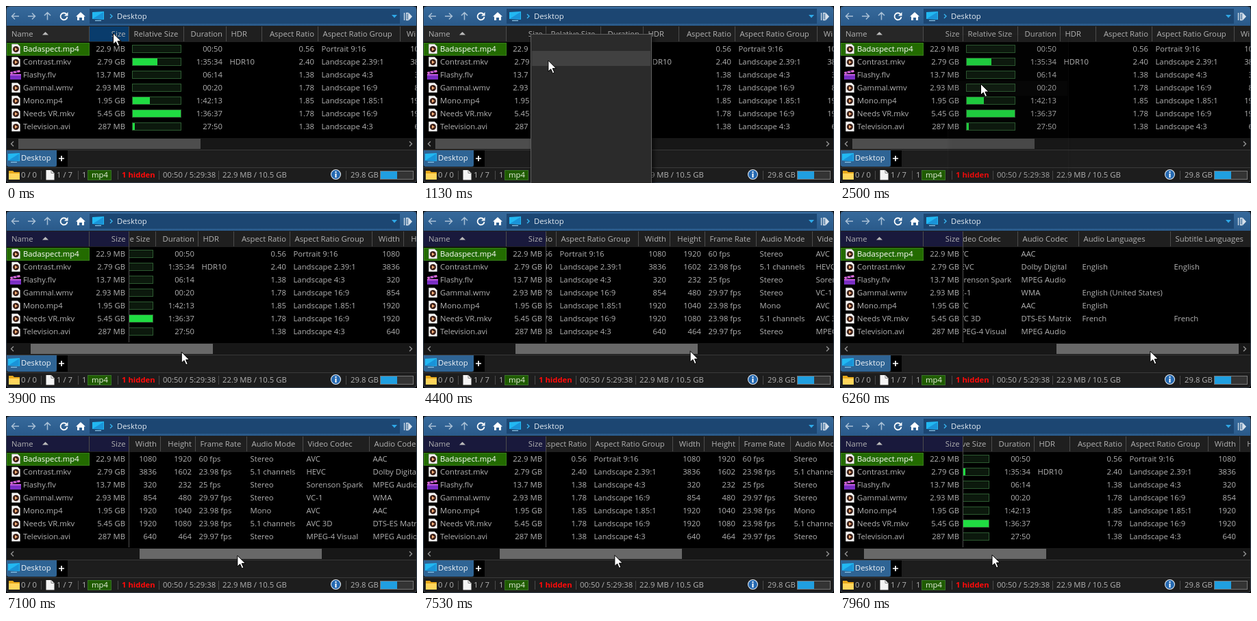
Animation of 600 by 260 pixels, one loop 8 s. Source, as an HTML page with a canvas:

```html
<!DOCTYPE html>
<html lang="en">
<head>
<meta charset="utf-8">
<title>File list with frozen columns</title>
<style>
html, body { margin: 0; width: 100%; height: 100%; overflow: hidden; background: #000; }
canvas { display: block; width: 600px; height: 260px; }
</style>
</head>
<body>
<canvas id="stage"></canvas>
<script>
const LOOP = 8000, FROZEN = 180, THUMB_MIN = 18, THUMB_W = 266, SCROLL_RATIO = 2.237;
const FONT = '11.3px "Open Sans", "Noto Sans", sans-serif';
const GREY = '#b2b2b2';
const canvas = document.getElementById('stage');
const c = canvas.getContext('2d');
const dpr = window.devicePixelRatio || 1;
canvas.width = 600 * dpr;
canvas.height = 260 * dpr;

const names = ['Badaspect.mp4', 'Contrast.mkv', 'Flashy.flv', 'Gammal.wmv', 'Mono.mp4', 'Needs VR.mkv', 'Television.avi'];
const sizes = ['22.9 MB', '2.79 GB', '13.7 MB', '2.93 MB', '1.95 GB', '5.45 GB', '287 MB'];
const shares = [0, 0.51, 0, 0, 0.35, 1, 0.045];

// title, left edge, right aligned, one value per row
const columns = [
  ['Relative Size', 180, false, ''],
  ['Duration', 260, true, '00:50|1:35:34|06:14|00:20|1:42:13|1:36:37|27:50'],
  ['HDR', 322, false, '|HDR10'],
  ['Aspect Ratio', 374, true, '0.56|2.40|1.38|1.78|1.85|1.78|1.38'],
  ['Aspect Ratio Group', 456, false, 'Portrait 9:16|Landscape 2.39:1|Landscape 4:3|Landscape 16:9|Landscape 1.85:1|Landscape 16:9|Landscape 4:3'],
  ['Width', 576, true, '1080|3836|320|854|1920|1920|640'],
  ['Height', 622, true, '1920|1602|232|480|1040|1080|464'],
  ['Frame Rate', 673, false, '60 fps|23.98 fps|25 fps|29.97 fps|23.98 fps|23.98 fps|29.97 fps'],
  ['Audio Mode', 748, false, 'Stereo|5.1 channels|Stereo|Stereo|Mono|5.1 channels|Stereo'],
  ['Video Codec', 830, false, 'AVC|HEVC|Sorenson Spark|VC-1|AVC|AVC 3D|MPEG-4 Visual'],
  ['Audio Codec', 927, false, 'AAC|Dolby Digital|MPEG Audio|WMA|AAC|DTS-ES Matrix|MPEG Audio'],
  ['Audio Languages', 1016, false, '|English||English (United States)|English|French'],
  ['Subtitle Languages', 1150, false, '|English||||French']
].map(([title, x, right, cells]) => ({ title, x, right, cells: cells.split('|') }));
const END = 1267;

const cursorKeys = [[0, 156.5, 40], [800, 156.5, 40], [1430, 205.5, 114.5], [2500, 205.5, 114.5], [3300, 238, 206],
  [3600, 241, 207], [3900, 256, 207], [4860, 513, 204.5], [5250, 545, 206], [5640, 540, 206],
  [6260, 453, 206], [7100, 338, 205], [7960, 222, 204]];
const thumbKeys = [[0, 18], [3650, 18], [3900, 36], [4140, 73], [4860, 243], [5200, 316], [6460, 316], [7100, 195], [7460, 125], [7960, 35]];

function at(keys, t) {
  const i = keys.findIndex(k => k[0] > t);
  if (i < 0) return keys[keys.length - 1].slice(1);
  const a = keys[i - 1], b = keys[i];
  let p = (t - a[0]) / (b[0] - a[0]);
  if (b[0] <= 3300) p = p * p * (3 - 2 * p);
  return a.slice(1).map((v, k) => v + (b[k + 1] - v) * p);
}

function rect(x, y, w, h, color) {
  c.fillStyle = color;
  c.fillRect(x, y, w, h);
}

function frame(x, y, w, h, color) {
  c.strokeStyle = color;
  c.lineWidth = 1;
  c.strokeRect(x + 0.5, y + 0.5, w - 1, h - 1);
}

function text(s, x, y, color = GREY, align = 'left', font = FONT) {
  c.font = font;
  c.fillStyle = color;
  c.textAlign = align;
  c.fillText(s, x, y);
}

function path(d, fill, stroke, width = 1) {
  const p = new Path2D(d);
  if (fill) { c.fillStyle = fill; c.fill(p); }
  if (stroke) { c.strokeStyle = stroke; c.lineWidth = width; c.stroke(p); }
}

function disc(x, y, r, fill) {
  c.beginPath();
  c.arc(x, y, r, 0, 7);
  c.fillStyle = fill;
  c.fill();
}

function clip(x, y, w, h, draw) {
  c.save();
  c.beginPath();
  c.rect(x, y, w, h);
  c.clip();
  draw();
  c.restore();
}

function monitor(x, y) {
  path(`M${x} ${y + 1}L${x + 17} ${y}V${y + 12}L${x} ${y + 11}Z`, '#22b8f2');
  path(`M${x + 1} ${y + 10.5}L${x + 16} ${y + 1}V${y + 11.5}Z`, '#1a93d8');
  path(`M${x + 4} ${y + 13.5}H${x + 13}`, null, '#8cc8ea', 1.2);
}

function toolbar() {
  const g = c.createLinearGradient(0, 0, 0, 29);
  g.addColorStop(0, '#376a9c');
  g.addColorStop(1, '#2a5a8a');
  rect(1, 1, 598, 28, g);
  rect(122, 4, 453, 22, '#1c4672');
  path('M19 15H8.5M13 10.5L8.5 15L13 19.5M32 15H42.5M38 10.5L42.5 15L38 19.5M60.5 20.5V9.5M56 14L60.5 9.5L65 14', null, '#a9c0d6', 1.5);
  path('M88.5 12.2A5 5 0 1 0 89.5 16', null, '#fff', 1.8);
  path('M90.5 9V14.5H85Z', '#fff');
  path('M102 15.5L109 9L116 15.5H114V21H111V17H107V21H104V15.5Z', '#fff');
  monitor(126, 8);
  path('M152 12L155 15L152 18', null, '#38b6f0', 1.4);
  text('Desktop', 162, 19, '#e2e9f0');
  path('M563 13H571L567 17.5Z', '#2fa9e8');
  path('M581.5 10V21M584.5 10.5H587V20.5H584.5Z', null, '#d8e2ec', 1.3);
  path('M588 10L593 15.5L588 21Z', '#d8e2ec');
}

function fileIcon(row, y) {
  if (row === 2) {
    path(`M6 ${y - 4}L20 ${y - 7}L21 ${y - 4}L7 ${y - 1}Z`, '#e070d8');
    path(`M9 ${y - 5}L12 ${y - 2}M14 ${y - 6}L17 ${y - 3}`, null, '#4a1a78', 1.5);
    rect(6, y - 1, 16, 8, '#7a2fc4');
    rect(6, y - 1, 16, 2, '#c45ae0');
    return;
  }
  path(`M8.5 ${y - 7}H17L20.5 ${y - 3.5}V${y + 7}H8.5Z`, '#f4f4f4', '#aaa', 0.7);
  disc(14.5, y + 0.5, 4.5, '#3c2018');
  path(`M13 ${y - 2}L17 ${y + 0.5}L13 ${y + 3}Z`, '#ffb27a');
}

function list(scroll, frozen, hover) {
  const rowY = row => 63 + row * 19;
  rect(1, 29, 598, 24, '#1f1f1f');
  clip(FROZEN, 29, 419, 164, () => columns.forEach((col, i) => {
    const x = col.x - scroll;
    const right = (i + 1 < columns.length ? columns[i + 1].x : END) - scroll;
    if (right < FROZEN || x > 600) return;
    rect(right - 1, 30, 1, 22, '#4c4c4c');
    const edge = col.right ? right - 6 : x;
    const align = col.right ? 'right' : 'left';
    text(col.title, edge + (col.right ? 0 : 6.5), 45, GREY, align);
    col.cells.forEach((s, row) => s && text(s, edge + (col.right ? 0 : 4.5), rowY(row) + 4, GREY, align));
    if (i === 0) shares.forEach((share, row) => {
      const y = rowY(row) - 6;
      rect(x + 4, y, 72, 12, '#0c190d');
      rect(x + 5, y + 1, Math.round(70 * share), 10, '#20dc42');
      frame(x + 4, y, 72, 12, '#2d5a31');
    });
  }));
  rect(1, 30, 121, 22, frozen ? '#19193c' : '#272727');
  rect(122, 30, 57, 22, frozen ? '#19193c' : '#1f1f1f');
  if (hover > 0) {
    c.globalAlpha = hover;
    rect(122, 30, 58, 22, '#093c6c');
    c.globalAlpha = 1;
  }
  rect(121, 30, 1, 22, '#4c4c4c');
  rect(179, 30, 1, frozen ? 163 : 22, '#4c4c4c');
  text('Name', 8, 45);
  path('M53 42.5H62L57.5 38Z', '#bbb');
  text('Size', 174.5, 45, GREY, 'right');
  rect(1, 54, 121, 19, '#236b00');
  frame(1, 54, 121, 19, '#37801a');
  names.forEach((name, row) => {
    const y = rowY(row);
    fileIcon(row, y);
    text(name, 25, y + 4, row ? GREY : '#fff');
    text(sizes[row], 174, y + 4, GREY, 'right');
  });
}

function scrollbar(x, active) {
  rect(1, 194, 598, 17, '#171717');
  rect(x, 195, THUMB_W, 15, active ? '#686868' : '#4d4d4d');
  path('M11 199L7.5 202.5L11 206M589 199L592.5 202.5L589 206', null, '#999', 1.3);
}

function bottom() {
  rect(1, 211, 598, 48, '#1d1d1d');
  rect(1, 211, 598, 1, '#383838');
  path('M1 212H74V233Q74 236 71 236H4Q1 236 1 233Z', '#2f6494');
  rect(74, 212, 16, 24, '#000');
  path('M77 224H85M81 220V228', null, '#fff', 1.7);
  monitor(3, 216);
  text('Desktop', 22, 227, '#f0f4f8');
  rect(1, 237, 598, 1, '#3a3a3a');

  path('M4 242H10L12 244H20V255H4Z', '#e8a91c');
  path('M4 246H20V255H4Z', '#ffd65c');
  path('M58.5 241H66L70.5 245.5V255.5H58.5Z', '#f4f4f4');
  path('M66 241V245.5H70.5', null, '#888', 1);
  [51, 105, 163, 223, 310, 496].forEach(x => rect(x, 242, 1, 13, '#4a4a4a'));
  text('0 / 0', 22, 252);
  text('1 / 7', 74, 252);
  text('1', 111, 252);
  rect(119, 241, 35, 15, '#205c00');
  frame(119, 241, 35, 15, '#38722a');
  text('mp4', 125, 252, '#e8f0e4');
  text('1 hidden', 169, 252, '#ff0a0a', 'left', 'bold ' + FONT);
  text('00:50 / 5:29:38', 229, 252);
  text('22.9 MB / 10.5 GB', 316, 252);
  disc(481.5, 247.5, 7.5, '#e8eef4');
  disc(481.5, 247.5, 6.5, '#2468b0');
  rect(480.5, 243, 2, 2, '#fff');
  rect(480.5, 246, 2, 6, '#fff');
  text('29.8 GB', 503, 252);
  rect(547, 242, 48, 12, '#343434');
  rect(547, 242, 24, 12, '#209fe0');
  frame(546, 242, 49, 13, '#777');
}

function menu(alpha, pointerY) {
  c.save();
  c.globalAlpha = alpha;
  c.shadowColor = 'rgba(0,0,0,.6)';
  c.shadowBlur = 6 * dpr;
  c.shadowOffsetX = c.shadowOffsetY = 3 * dpr;
  rect(157, 41, 177, 230, '#2b2b2b');
  c.shadowColor = 'transparent';
  frame(157, 41, 177, 230, '#606060');
  const row = Math.floor((pointerY - 44) / 22);
  if (row >= 0) rect(159, 44 + row * 22, 173, 22, '#414141');
  c.restore();
}

function cursor(x, y) {
  path(`M${x} ${y}V${y + 16}L${x + 3.8} ${y + 12.6}L${x + 6.5} ${y + 18.8}L${x + 9} ${y + 17.7}L${x + 6.4} ${y + 11.6}H${x + 11.5}Z`, '#fff', '#000', 1);
}

function draw(now) {
  const t = now % LOOP;
  const [cx, cy] = at(cursorKeys, t);
  const thumb = at(thumbKeys, t)[0];
  const scroll = Math.round((thumb - THUMB_MIN) * SCROLL_RATIO);
  const fade = Math.min(1, Math.max(0, (t - 430) / 170));
  const menuAlpha = t < 2500 ? fade : t < 2530 ? 0.06 : 0;
  c.setTransform(dpr, 0, 0, dpr, 0, 0);
  rect(0, 0, 600, 260, '#000');
  toolbar();
  list(scroll, t >= 2560, 1 - fade);
  scrollbar(Math.round(thumb), t >= 3270);
  bottom();
  c.beginPath();
  c.roundRect(0.5, 0.5, 599, 259, 5);
  c.strokeStyle = '#34404e';
  c.lineWidth = 1;
  c.stroke();
  if (menuAlpha) menu(menuAlpha, cy);
  cursor(cx, cy);
}

const start = performance.now();
function tick() {
  draw(performance.now() - start);
  requestAnimationFrame(tick);
}
tick();
</script>
</body>
</html>
```
